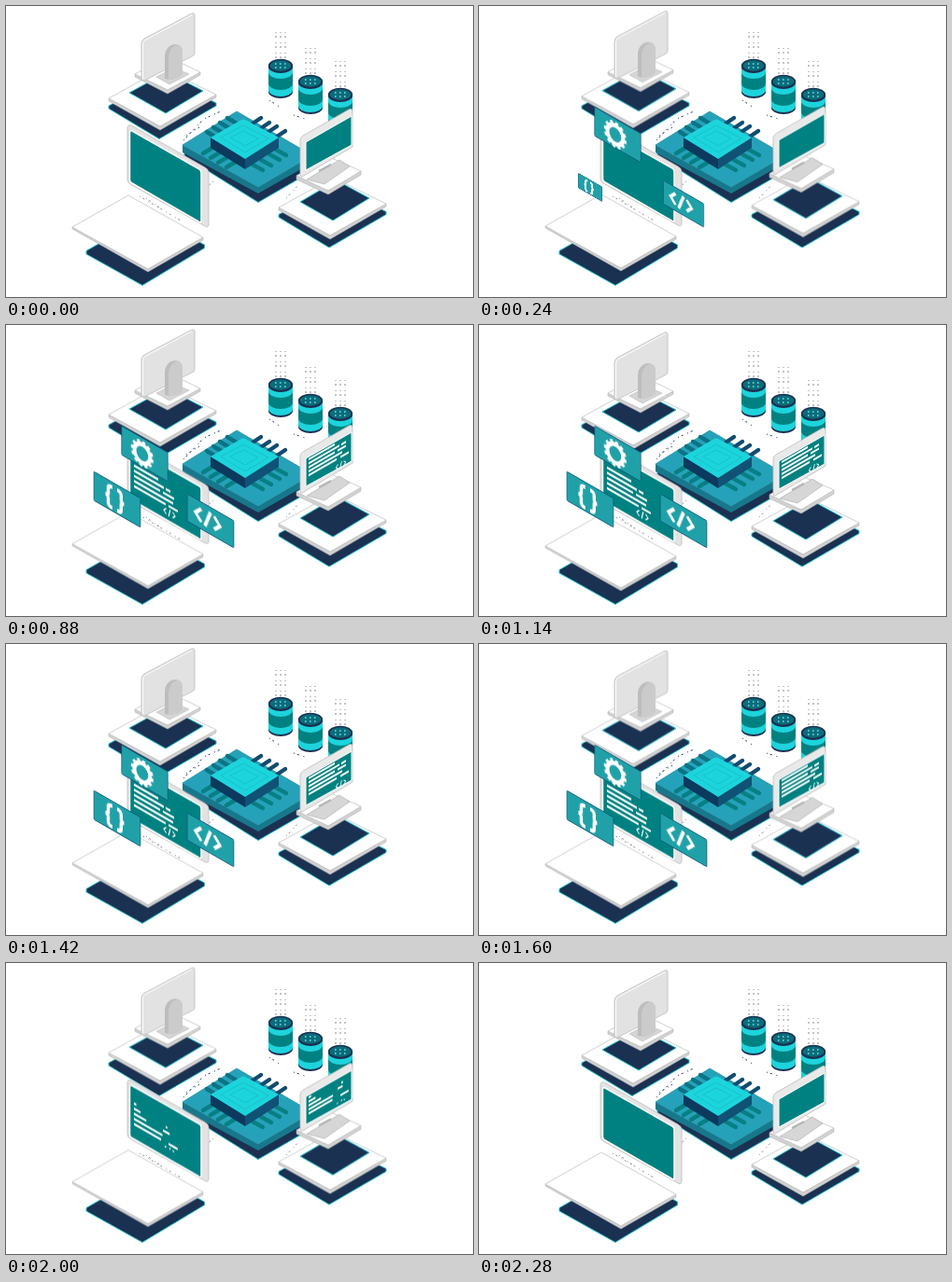
These frames come from a looping animation (500 px wide and 312 px high, 2400 ms). An HTML page:

```html
<!DOCTYPE html>
<html lang="en">
<head>
<meta charset="utf-8">
<title>Isometric workstations</title>
<style>
html, body { margin: 0; width: 100%; height: 100%; overflow: hidden; background: #fff; }
svg { display: block; width: 100%; height: 100%; }
.navy { fill: #1b3151; }
.teal { fill: #008181; }
.rim { stroke: #24c3d3; stroke-width: 1; }
.white { fill: #fff; stroke: #c4c4c4; stroke-width: .8; }
.edge { fill: #d2d2d2; stroke: #b5b5b5; stroke-width: .6; }
.ink { fill: none; stroke: #fff; }
.dots { fill: none; stroke: #85888f; stroke-width: 1; stroke-dasharray: 1 3 2 5; }
.dark { stroke: #1b3151; }

.float { animation: float 2.4s infinite; }
.late { --lift: -2.5px; animation-delay: 60ms; }
@keyframes float {
  0%, 2.5%, 25%, 47.5%, 70%, 92.5%, 100% { transform: translateY(0); animation-timing-function: ease-in-out; }
  13.75%, 36.25%, 58.75%, 81.25% { transform: translateY(var(--lift, -3px)); animation-timing-function: ease-in-out; }
}

.panel rect { fill: #20a1a8; stroke: #0e5a7c; stroke-width: .9; }
.panel { transform-origin: 0 15px; animation: 2.4s linear infinite; }
.gear { animation-name: gear; }
.tag { animation-name: tag; }
.brace { animation-name: brace; }
@keyframes gear {
  0%, 2.5%, 81.667%, 100% { transform: scale(0); }
  8.333%, 75.833% { transform: scale(1); }
}
@keyframes tag {
  0%, 5%, 79.167%, 100% { transform: scale(0); }
  10.833%, 73.333% { transform: scale(1); }
}
@keyframes brace {
  0%, 7.5%, 76.667%, 100% { transform: scale(0); }
  12.5%, 71.667% { transform: scale(1); }
}

.code path { stroke-dasharray: 1 2; stroke-dashoffset: 1.01; animation: type 2.4s linear infinite backwards; }
@keyframes type {
  0%, 12%, 84%, 100% { stroke-dashoffset: 1.01; }
  18%, 78% { stroke-dashoffset: 0; }
}
</style>
</head>
<body>
<svg viewBox="0 0 500 312">
  <defs>
    <path id="base" class="navy rim" d="M110 107V110L164 142.500 225 107V104L168 76Z"/>
    <g id="slab">
      <path class="edge" d="M110 99V102L165 133 225 98V95L165 129Z"/>
      <path class="white" d="M110 99 168 67 225 95 165 129Z"/>
    </g>
    <g id="can">
      <path class="navy" d="M-13 0V28A13 7 0 0 0 13 28V0Z"/>
      <path fill="#1dd3dc" d="M-13 1V26A13 7 0 0 0 13 26V1A13 7 0 0 1 -13 1Z"/>
      <path class="teal" d="M-13 7V19A13 7 0 0 0 13 19V7A13 7 0 0 1 -13 7Z"/>
      <ellipse class="dark" fill="#0a6d7c" rx="12.300" ry="6.500" stroke-width="1.700"/>
      <path fill="none" stroke="#7be3e6" stroke-width="1.500" stroke-dasharray="1.500 3.500" d="M-6-2H7M-6 2H7"/>
      <path class="dots" d="M-5-36V-5M0-36V-5M5-36V-5"/>
    </g>
    <path id="tagIcon" d="M-8-7-15 0-8 7M8-7 15 0 8 7M3.500-9-3.500 9"/>
  </defs>

  <!-- processor -->
  <path class="navy rim" d="M191 156V161L270 210.500 328 177V165L270 196Z"/>
  <path fill="#17788c" d="M189 149V157L270 201 328 168V160L270 194Z"/>
  <path fill="#25a2b9" stroke="#1b8ba2" stroke-width=".7" d="M189 149 247 113 328 160 270 194Z"/>
  <g fill="none" stroke-width="4.4" stroke-linecap="round">
    <path stroke="#0b7485" d="M215 135 225 141M222 130 232 136M229 125 239 131M237 120 247 126"/>
    <path stroke="#124c70" d="M264 126 273 120M273 131 282 125M281 135 290 129M290 140 299 134"/>
    <path stroke="#087f83" d="M221 152 211 158M229 157 219 163M237 162 227 168M246 167 236 173M264 170 275 176M273 165 284 171M282 159 293 165M289 154 300 160"/>
  </g>
  <path fill="#0b3a5e" d="M219 141V152L256 175V163Z"/>
  <path fill="#0f5276" d="M292 141V152L256 175V163Z"/>
  <path fill="#1cd5dc" d="M219 141 252 122Q254 121 256 122L292 141 256 164Z"/>
  <g fill="none" stroke="#18bac6" stroke-width=".8" stroke-linejoin="round">
    <path d="M230 141 254 128 281 142 256 157Z"/>
    <path d="M240 141 254 134 270 142 256 150Z"/>
  </g>
  <path class="dots dark" d="M190 144 212 121 232 112M193 139 207 130M282 101 294 109M308 117 320 121"/>
  <path class="dots" d="M222 188 213 196M143 204 187 230M150 206 164 216M300 206 315 190"/>

  <use href="#can" x="294" y="64"/>
  <use href="#can" x="326" y="81"/>
  <use href="#can" x="358" y="95"/>

  <!-- monitor seen from behind -->
  <use href="#base"/>
  <g class="float">
    <use href="#slab"/>
    <path class="navy rim" d="M132 93 172 71 211 91 171 115Z"/>
    <path class="edge" d="M138 73V76L173 94 208 74V71L173 90Z"/>
    <path class="white" d="M138 73 173 54 208 71 173 90Z"/>
    <path fill="#e2e2e2" stroke="#bdbdc2" stroke-width=".8" d="M145 41Q145 37 148 35L198 8.500Q202 6.500 202 10V50Q202 53 199 54L148 80Q145 81 145 78Z"/>
    <path fill="none" stroke="#fff" d="M146.500 78V41Q146.500 38 149 36.500L199 9.500"/>
    <path fill="#d5d5d5" stroke="#bbb" stroke-width=".6" d="M161 76 180 66 196 73 175 84Z"/>
    <path fill="#bdbdbd" d="M170 78V53Q171 43 180 41Q189 41 189 50V73Q180 81 170 78Z"/>
    <path fill="#cbcbcb" d="M174 79V54Q175 45 183 41.500Q189 42 189 50V73Q182 79 174 79Z"/>
  </g>

  <!-- laptop -->
  <use href="#base" x="182" y="116.500"/>
  <g class="float">
    <use href="#slab" x="182" y="117"/>
    <path class="navy rim" d="M315 210 354 187 389 206 350 230Z"/>
    <path class="edge" d="M311 182V186L345 202 380 181V177L345 198Z"/>
    <path class="white" d="M311 182 346 162 380 177 345 198Z"/>
    <path fill="#d6d6d6" stroke="#aaa" stroke-width=".6" d="M322 186 357 165 368 172 341 191Z"/>
    <path fill="none" stroke="#b4b4b4" stroke-width="2" d="M335 177 348 170"/>
    <path fill="#e9e9e9" stroke="#bdbdbd" stroke-width=".8" d="M315 144Q315 141 318 139L367 111Q371 109 371 113V151L317 183Q315 184 315 181Z"/>
    <path class="teal" stroke="#fff" stroke-width="1" d="M321 146 370 118V149L321 176Z"/>
    <g class="ink code" data-rows="0 0 28,0 4.3 33,35 4.3 40,0 8.6 28,31 8.6 40,0 12.9 36,0 17.2 30,34 17.2 43" transform="matrix(1 -.577 0 1 324 147)" stroke-width="2.200"></g>
    <g class="ink code" transform="matrix(.866 -.5 0 1 358.500 153)">
      <path pathLength="1" d="M-3.500-2.500-6 0-3.500 2.500M3.500-2.500 6 0 3.500 2.500M1-3.500-1 3.500"/>
    </g>
  </g>

  <!-- large monitor -->
  <path class="navy rim" d="M86 262.500V266L146 299.500 212.500 259.500V256L153 224Z"/>
  <g class="float late">
    <path class="edge" d="M71 237V239L152 285 211 251V248L152 282Z"/>
    <path class="white" d="M71 237 131 203 211 248 152 282Z"/>
    <path fill="#e3e3e3" stroke="#bdbdbd" stroke-width=".8" d="M130 131Q130 127 134 128L213 173Q217 175 217 179V234Q217 238 213 236L133 191Q130 189 130 186Z"/>
    <path class="teal" stroke="#fff" stroke-width="1.500" d="M132.500 136Q132.500 133 135 134L207 175Q209 176 209 179V230Q209 233 206 231L135 190Q132.500 189 132.500 186Z"/>
    <g class="ink code" data-rows="0 0 26,0 5.500 32,34 5.500 39,0 11 28,31 11 43,0 16.500 42,0 22 34,37 22 47" transform="matrix(1 .577 0 1 137 153)" stroke-width="2.400"></g>
    <g class="ink code" transform="matrix(.866 .5 0 1 175 204)" stroke-width="1.200">
      <path pathLength="1" d="M-4-3-7 0-4 3M4-3 7 0 4 3M1-4-1 4"/>
    </g>
  </g>

  <!-- pop-up panels -->
  <g transform="matrix(.866 .5 0 1 148.500 138)">
    <g class="panel gear">
      <rect x="-28.500" y="-15.500" width="57" height="31" rx="1"/>
      <g class="ink" transform="translate(-3 1.500)">
        <circle r="9.700" stroke-width="4.600"/>
        <circle r="12.500" stroke-width="3" pathLength="24" stroke-dasharray="1.100 .9"/>
      </g>
    </g>
  </g>
  <g transform="matrix(.866 .5 0 1 219 210)">
    <g class="panel tag">
      <rect x="-28.800" y="-14.500" width="57.600" height="29" rx="1"/>
      <use href="#tagIcon" class="ink" stroke-width="3.800" x="-3.500"/>
    </g>
  </g>
  <g transform="matrix(.866 .5 0 1 119 187)">
    <g class="panel brace">
      <rect x="-28.800" y="-15.500" width="57.600" height="31" rx="1"/>
      <path class="ink" stroke-width="4" transform="translate(-3 1)" d="M-3-11H-4.500Q-8-11-8-7V-3Q-8 0-11.500 0Q-8 0-8 3V7Q-8 11-4.500 11H-3M3-11H4.500Q8-11 8-7V-3Q8 0 11.500 0Q8 0 8 3V7Q8 11 4.500 11H3"/>
    </g>
  </g>
</svg>
<script>
const NS = 'http://www.w3.org/2000/svg';

// Each row is "start y end"; rows type in one after another.
for (const group of document.querySelectorAll('[data-rows]')) {
  group.dataset.rows.split(',').forEach((row, i) => {
    const [x, y, end] = row.split(' ');
    const line = document.createElementNS(NS, 'path');
    line.setAttribute('d', `M${x} ${y}H${end}`);
    line.setAttribute('pathLength', 1);
    line.style.animationDelay = `${i * 18}ms`;
    group.append(line);
  });
}
</script>
</body>
</html>
```
